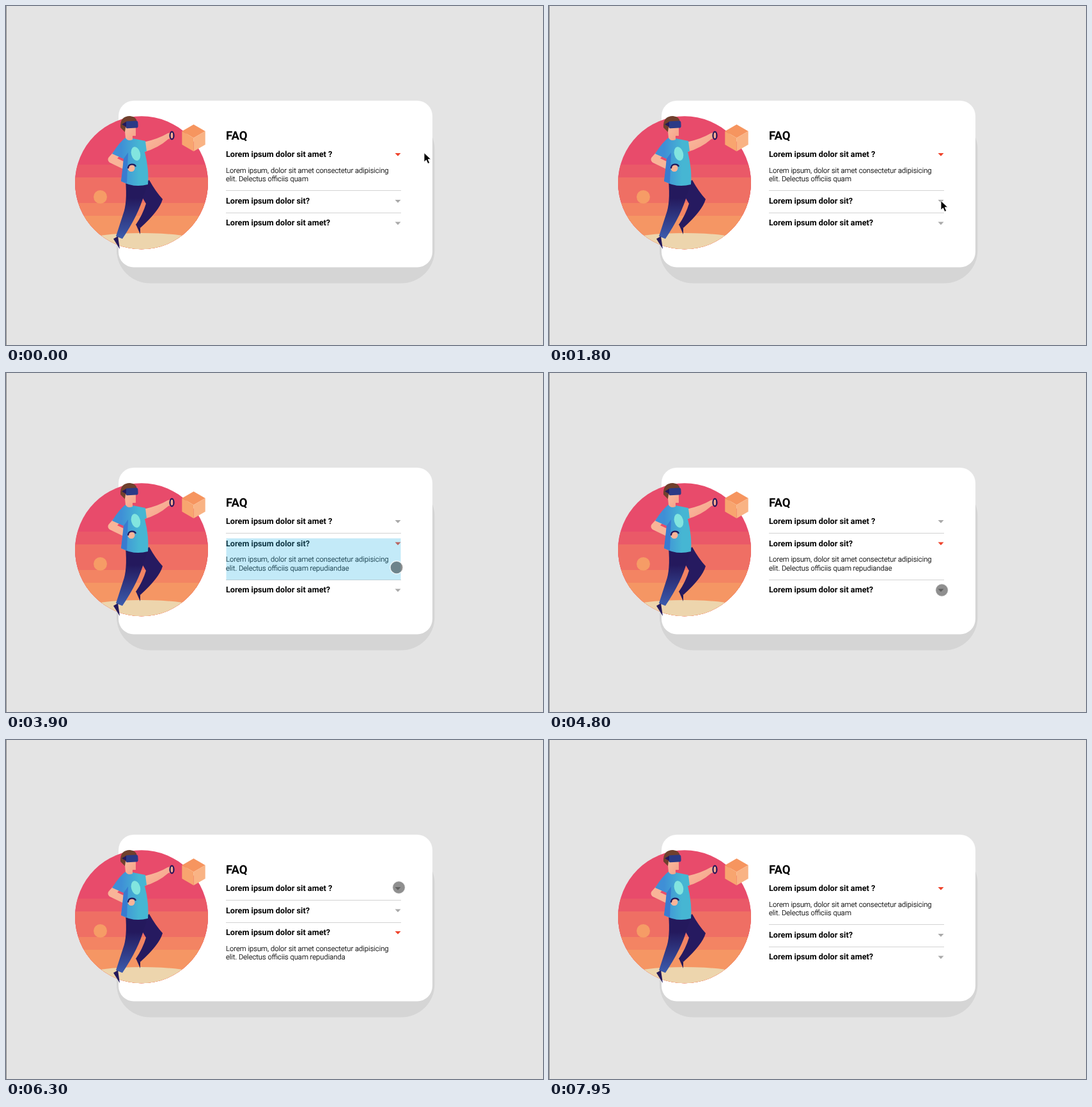
These frames come from a looping animation (840x530 px, 9300 ms). An HTML page:

```html
<!DOCTYPE html>
<html lang="en">
<head>
<meta charset="utf-8">
<title>FAQ accordion</title>
<style>
  html, body { margin: 0; width: 100%; height: 100%; overflow: hidden; background: #e4e4e4; }
  svg { display: block; width: 840px; height: 530px; }
  text { font-family: Roboto, sans-serif; text-rendering: geometricPrecision; }
  .title { font-size: 18.6px; font-weight: 700; }
  .head { font-size: 12.7px; font-weight: 600; }
  .body { font-size: 11.25px; font-weight: 300; stroke: #000; stroke-width: .18; }
  .navy { fill: #24195b; }
  .ring { fill: none; stroke: #24195b; stroke-width: 2.2; }
</style>
</head>
<body>
<svg viewBox="0 0 840 530" xmlns="http://www.w3.org/2000/svg">
  <defs>
    <clipPath id="disc"><circle cx="212" cy="276.300" r="104"/></clipPath>
    <linearGradient id="shirt"><stop offset=".25" stop-color="#3f8fd6"/><stop offset=".75" stop-color="#46b6d3"/></linearGradient>
    <linearGradient id="leg" x2="0" y2="1"><stop offset=".3" stop-color="#24195d"/><stop offset="1" stop-color="#3c5cae"/></linearGradient>
    <linearGradient id="skin" x2="1" y2="1"><stop offset="0" stop-color="#fbbd9f"/><stop offset="1" stop-color="#f4a088"/></linearGradient>
  </defs>

  <rect width="840" height="530" fill="#e4e4e4"/>
  <rect width="1" height="530" fill="#8c8c8c"/>
  <rect x="173" y="172" width="497.500" height="261.500" rx="52" fill="#d5d5d5"/>
  <rect x="176" y="148" width="491" height="260.500" rx="24" fill="#fff"/>

  <g clip-path="url(#disc)">
    <g id="sky"></g>
    <ellipse cx="212" cy="400" rx="160" ry="45" fill="#edd5ad"/>
    <circle cx="147.500" cy="298.500" r="10.500" fill="#f69c66"/>
  </g>
  <g id="cube" transform="translate(293.500 206.300)"></g>

  <g id="person">
    <path d="M212 280 224 272Q234 290 245 302 240 320 210 347L203 342Q214 326 219 309 214 300 207 290Z" fill="#261a60"/>
    <path d="M187 273Q190 308 183 326L172 360 182 364Q207 327 216 295L222 278Z" fill="url(#leg)"/>
    <path class="navy" d="M203 341 210 347 210 357ZM168 364 175 360 178 380Z"/>
    <path d="M175 229 165 240 192 253" fill="none" stroke="#f9b498" stroke-width="11" stroke-linejoin="round" stroke-linecap="round"/>
    <path d="M215 213Q238 208 253 199L261 197V206L254 208Q238 222 217 228Z" fill="url(#skin)"/>
    <path d="M188 205Q178 212 166 231L184 239Q183 258 180 274 200 285 222 279 224 255 217 228L220 227 218 211Z" fill="url(#shirt)"/>
    <path d="M184 239 191 229 189 277 180 274Z" fill="#397bd0"/>
    <ellipse cx="203" cy="231" rx="7" ry="11" fill="#82e5df" transform="rotate(-15 203 231)"/>
    <path d="M185 186H203V203H198V209Q190 212 187 206Z" fill="url(#skin)"/>
    <path d="M179 190Q178 172 194 172 204 173 205 181L188 183 186 197Z" fill="#70402d"/>
    <rect x="187" y="180" width="19.500" height="11" rx="3" fill="#2b3a86" transform="rotate(-3 196 185)"/>
    <path class="navy" d="M181 185 188 181V189Z"/>
    <circle cx="196" cy="253.500" r="5.500" fill="#f9b498"/>
    <path class="ring" d="M191 254C191 246 201 246 203 251"/>
    <ellipse class="ring" cx="259.500" cy="202.500" rx="3" ry="5.800"/>
  </g>

  <text class="title" x="344" y="209">FAQ</text>
  <g id="list"></g>
  <rect id="flash" x="344.500" width="273" height="65" fill="#33b5e5"/>
  <circle id="touch" r="10" fill="#000" fill-opacity=".44" stroke="#fff" stroke-width="1.400" stroke-opacity=".75"/>
  <path id="arrow" d="M.5.500V15L3.900 11.800 6.400 17.500 9.200 16.300 6.700 10.800H11.300Z" stroke="#fff" stroke-width=".9"/>
</svg>
<script>
const LOOP = 9300, STEP = 150;
const LEFT = 344, TOP = 236, PITCH = 34.5, OPEN = 38.4;
const GLOW = 0.4, FADE = 180;
const lead = "Lorem ipsum, dolor sit amet consectetur adipisicing";
const items = [
  ["Lorem ipsum dolor sit amet ?", "elit. Delectus officiis quam"],
  ["Lorem ipsum dolor sit?", "elit. Delectus officiis quam repudiandae"],
  ["Lorem ipsum dolor sit amet?", "elit. Delectus officiis quam repudianda"]
];
const sky = { 172: "#e84b6b", 248: "#ea5968", 268: "#ef6f64", 308: "#f38463", 328: "#f59664" };
const faces = ["#f6955f", "#f9b384", "#f8a56f"];

const home = [653.5, 229];
const moves = [
  { from: 150, till: 600, to: [613, 261] },
  { from: 750, till: 1800, to: [612.5, 304], bow: -6 },
  { from: 2550, till: 2700, to: [611, 304] },
  { from: 3900, till: 4800, to: [614.5, 339.5] },
  { from: 5400, till: 6300, to: [614.5, 230.5], bow: 16 },
  { from: 7200, till: 7950, to: [770, 560] }
];
const TOUCH_ON = 2700, TOUCH_OFF = 7950;
const taps = [{ at: 3850, item: 1 }, { at: 5250, item: 2 }, { at: 6900, item: 0 }];

const $ = id => document.getElementById(id);
const clamp = v => Math.min(1, Math.max(0, v));
const ease = k => k * k * (3 - 2 * k);

function add(parent, tag, attrs, text = "") {
  const el = document.createElementNS("http://www.w3.org/2000/svg", tag);
  for (const k in attrs) el.setAttribute(k, attrs[k]);
  el.textContent = text;
  return parent.appendChild(el);
}

for (const y in sky) add($("sky"), "rect", { x: 100, y, width: 220, height: 220, fill: sky[y] });
faces.forEach((fill, i) =>
  add($("cube"), "path", { d: "M0 0-18.200-10.500 0-21 18.200-10.500Z", fill, transform: `rotate(${i * 120})` }));

const rows = items.map(([title, tail], i) => {
  const group = add($("list"), "g");
  add(group, "text", { class: "head", x: LEFT }, title);
  const mark = add(group, "path", { d: "M608.500-6H617.500L613-1.200Z", "stroke-linejoin": "round" });
  const body = add(group, "g", { class: "body" });
  add(body, "text", { x: LEFT, y: 24.7 }, lead);
  add(body, "text", { x: LEFT, y: 38 }, tail);
  const line = i < items.length - 1 && add($("list"), "rect", { x: LEFT, width: 274, height: 1, fill: "#d3d3d3" });
  return { group, mark, body, line };
});

function pointer(t) {
  let [x, y] = home;
  for (const { from, till, to, bow = 0 } of moves) {
    const k = clamp((t - from) / (till - from));
    x += (to[0] - x) * ease(k) + bow * Math.sin(Math.PI * k);
    y += (to[1] - y) * ease(k);
  }
  return `translate(${x} ${y})`;
}

function show(id, on, transform) {
  $(id).setAttribute("visibility", on ? "visible" : "hidden");
  $(id).setAttribute("transform", transform);
}

function draw(t) {
  const tap = taps.filter(p => p.at <= t).pop() || { at: -LOOP, item: 0 };
  let y = TOP;
  rows.forEach(({ group, mark, body, line }, i) => {
    const active = i === tap.item;
    group.setAttribute("transform", `translate(0 ${y})`);
    mark.setAttribute("fill", active ? "#ef432b" : "#a9a9a9");
    body.setAttribute("display", active ? "inline" : "none");
    if (active) $("flash").setAttribute("y", y - 12);
    y += PITCH + (active ? OPEN : 0);
    if (line) line.setAttribute("y", Math.floor(y - 20));
  });
  $("flash").setAttribute("opacity", GLOW * clamp(1 - (t - tap.at) / FADE));

  const at = pointer(t);
  show("arrow", t < TOUCH_ON, at);
  show("touch", t >= TOUCH_ON && t < TOUCH_OFF, at);
}

function tick(now) {
  draw(Math.floor(now % LOOP / STEP) * STEP);
  requestAnimationFrame(tick);
}
draw(0);
requestAnimationFrame(tick);
</script>
</body>
</html>
```
